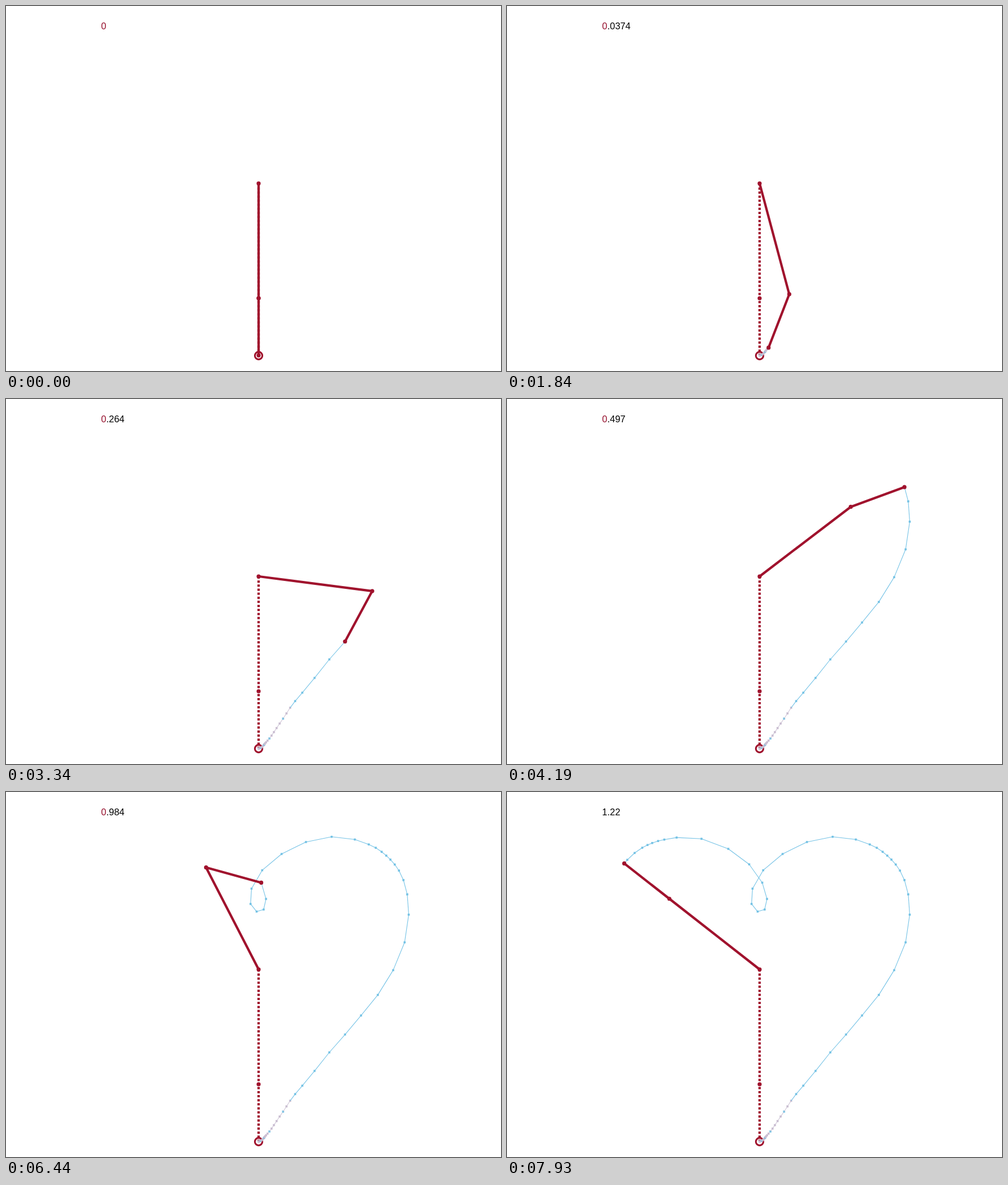
Recreate the animation shown at these times as an HTML page. Size 872 by 642 pixels, loop 8000 ms.

```html
<!DOCTYPE html>
<html lang="en">
<head>
<meta charset="utf-8">
<title>Two-bar linkage</title>
<style>
  html, body { margin: 0; width: 100%; height: 100%; overflow: hidden; background: #fff; }
  svg { display: block; width: 872px; height: 642px; }
  text { font: 16.4px "Liberation Sans", Arial, sans-serif; }
  .arm { fill: none; stroke: #a0122d; stroke-width: 4.2; stroke-linejoin: round; }
  .dot { fill: #a0122d; }
  .rest { stroke: #a0122d; stroke-width: 4.3; stroke-dasharray: 4 3.13; }
  .ring { fill: none; stroke: #a0122d; stroke-width: 3.1; }
  .seg { stroke: #76c3e6; stroke-width: 1.1; }
  .pt { fill: #74c2e4; }
  .seg.pale { stroke: #cfc5d6; }
  .pt.pale { fill: #c8bcd0; }
</style>
</head>
<body>
<svg viewBox="0 0 872 642">
  <text x="167.6" y="40.7"><tspan id="head"></tspan><tspan id="tail"></tspan></text>
  <line class="rest" x1="445" y1="312" x2="445" y2="613.5"/>
  <circle class="dot" cx="445" cy="514" r="3.6"/>
  <circle class="ring" cx="445" cy="615" r="6.6"/>
  <g id="trail"></g>
  <polyline class="arm" id="arm"/>
  <circle class="dot" cx="445" cy="312" r="3.6"/>
  <circle class="dot" id="elbow" r="3.6"/>
  <circle class="dot" id="tip" r="3.6"/>
</svg>
<script>
const LOOP = 8000, STEPS = 64, RAD = Math.PI / 180;
const PIVOT = [445, 312], UPPER = 201.8, LOWER = 100.8;
const $ = id => document.getElementById(id);

// Key poses: step, shoulder angle, elbow bend (degrees)
const keys = [
  [0, 0, 0], [9, 9.1, 22.4], [14, 15, 36.2], [20, 31.8, 70.6], [24, 48, 94.4],
  [26, 70, 110.2], [28, 95, 106.8], [30, 114.6, 82.5], [32, 124.9, 45.9],
  [34, 127.3, 17.1], [36, 126.9, -2], [40, 128.4, -23], [42, 129.6, -42.4],
  [45, 140.2, -101.4], [49, 177, -175], [52, 207.3, -227.3], [54, 221.9, -265.9],
  [56, 229.4, -306.6], [58, 230.8, -322.1], [61, 231.4, -337.7], [64, 232, -360]
];

// Counter readings at some steps
const marks = [[0, 0], [9, .0228], [20, .0864], [34, .497], [45, .691], [52, .984], [64, 1.22]];

// Index of the row that closes the span holding step i
const spanEnd = (rows, i) => Math.max(1, rows.findIndex(r => r[0] >= i));

// Smooth curve through column c of the key poses, at rest at both ends
function slope(k, c) {
  const a = keys[k - 1], b = keys[k + 1];
  return a && b ? (b[c] - a[c]) / (b[0] - a[0]) : 0;
}
function angle(i, c) {
  const k = spanEnd(keys, i), a = keys[k - 1], b = keys[k];
  const w = b[0] - a[0], u = (i - a[0]) / w, v = 1 - u;
  return a[c] * v * v * (1 + 2 * u) + b[c] * u * u * (1 + 2 * v)
    + w * u * v * (v * slope(k - 1, c) - u * slope(k, c));
}

const polar = ([x, y], r, deg) => [x + r * Math.sin(deg * RAD), y + r * Math.cos(deg * RAD)];
const dist = (a, b) => Math.hypot(a[0] - b[0], a[1] - b[1]);

const poses = Array.from({ length: STEPS + 1 }, (_, i) => {
  const shoulder = angle(i, 1), elbow = polar(PIVOT, UPPER, shoulder);
  return { elbow, tip: polar(elbow, LOWER, shoulder - angle(i, 2)) };
});

// Steps last 130 ms, every eighth one 70 ms
const start = i => 130 * i - 60 * Math.max(0, Math.floor((i - 1) / 8));

// Between known readings the counter follows the distance both joints travel
const travel = [0];
for (let i = 1; i <= STEPS; i++) {
  const a = poses[i - 1], b = poses[i];
  travel.push(travel[i - 1] + dist(a.elbow, b.elbow) + dist(a.tip, b.tip));
}
function reading(i) {
  const k = spanEnd(marks, i), [i0, v0] = marks[k - 1], [i1, v1] = marks[k];
  const v = v0 + (v1 - v0) * (travel[i] - travel[i0]) / (travel[i1] - travel[i0]);
  return String(Number(v.toPrecision(3)));
}

// Trail pieces, shown as the tip passes them; the slow opening is paler
function add(name, attrs) {
  const el = document.createElementNS("http://www.w3.org/2000/svg", name);
  for (const k in attrs) el.setAttribute(k, attrs[k]);
  return $("trail").appendChild(el);
}
const trail = poses.map(({ tip: [x, y] }, i) => {
  const [x1, y1] = poses[Math.max(0, i - 1)].tip, early = i < 23;
  return {
    seg: add("line", { class: early ? "seg pale" : "seg", x1, y1, x2: x, y2: y }),
    pt: add("rect", { class: early && i % 5 ? "pt pale" : "pt",
      x: x - 1.8, y: y - 1.8, width: 3.6, height: 3.6 })
  };
});

function place(el, [x, y]) {
  el.setAttribute("cx", x);
  el.setAttribute("cy", y);
}

function show(n) {
  const { elbow, tip } = poses[n], label = reading(n);
  $("arm").setAttribute("points", [PIVOT, elbow, tip].join(" "));
  place($("elbow"), elbow);
  place($("tip"), tip);
  $("head").textContent = label[0];
  $("head").setAttribute("fill", label[0] === "0" ? "#960f2c" : "#000");
  $("tail").textContent = label.slice(1);
  trail.forEach(({ seg, pt }, i) => {
    seg.style.display = i <= n ? "" : "none";
    pt.style.display = i < n ? "" : "none";
  });
}

let shown = -1;
const origin = performance.now();
function tick() {
  const t = (performance.now() - origin) % LOOP;
  let n = STEPS;
  while (start(n) > t) n--;
  if (n !== shown) show(shown = n);
  requestAnimationFrame(tick);
}
tick();
</script>
</body>
</html>
```
